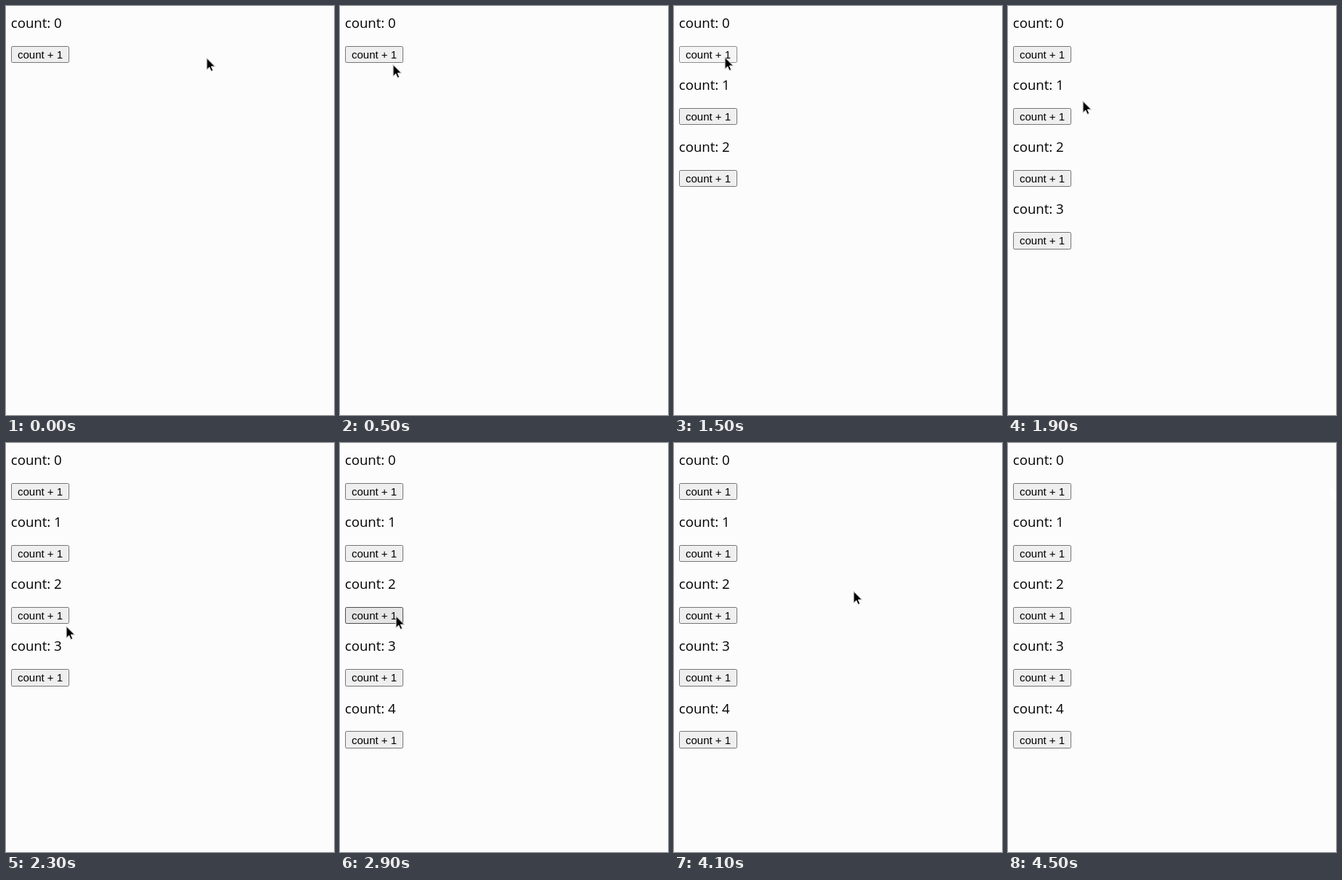
Recreate the animation shown at these times as an HTML page. Size 451x561 px, loop 4800 ms.

```html
<!DOCTYPE html>
<html lang="en">
<head>
<meta charset="utf-8">
<title>Counter</title>
<style>
  html, body { margin: 0; width: 100%; height: 100%; overflow: hidden; background: #fcfcfc; }
  svg { display: block; width: 451px; height: 561px; }
  .label { font: 18.6px "Open Sans", "Noto Sans", sans-serif; }
  .caption { font: 15px "Liberation Sans", Arial, sans-serif; }
  rect { fill: #efefef; stroke: #767676; }
  .hover rect { fill: #e5e5e5; stroke: #4f4f4f; }
  .active rect { fill: #f5f5f5; stroke: #8d8d8d; }
  #cursor { stroke: #fff; filter: drop-shadow(.5px .5px .7px #0006); }
  #cursor.leaving { fill: #fff; filter: none; }
</style>
</head>
<body>
<svg viewBox="0 0 451 561">
  <g id="list"></g>
  <path id="cursor" d="M1 .5V16.5L4.7 13L7.1 18.5L9.7 17.4L7.3 12H12.5Z"/>
</svg>
<script>
const LOOP = 4800, STEP = 100, PITCH = 85.2;
const list = document.getElementById('list');
const cursor = document.getElementById('cursor');

// When each counter appears, and when the mouse button is held down
const births = [0, 800, 1100, 1600, 2900];
const presses = [1500, 2800];

// Mouse moves, each a quadratic curve from, via and to a point
const home = [275, 71], first = [69, 70], below = [82, 251], third = [76, 237],
  rest = [195, 232], exit = [443, 60];
const moves = [
  { start: 0, end: 600, from: home, via: [58, 105], to: first },
  { start: 1700, end: 2300, from: first, via: [140, 160], to: below },
  { start: 2300, end: 2600, from: below, via: [79, 244], to: third },
  { start: 3300, end: 3600, from: third, via: [135, 236], to: rest },
  { start: 4000, end: 4500, from: rest, via: [323, 163], to: exit }
];

const blocks = births.map((birth, i) => {
  const y = base => Math.round(base + i * PITCH);
  const top = y(54.6), bottom = y(78);
  const el = document.createElementNS('http://www.w3.org/2000/svg', 'g');
  el.innerHTML = `<text class="label" x="6.8" y="${y(29.8)}">count: ${i}</text>
    <rect x="7.5" y="${top + .5}" width="79" height="${bottom - top - 1}" rx="1.7"/>
    <text class="caption" x="16" y="${y(71.8)}">count + 1</text>`;
  list.append(el);
  return { el, birth, top, bottom };
});

function mouseAt(t) {
  const { start, end, from, via, to } = moves.findLast(move => move.start <= t);
  const u = Math.min((t - start) / (end - start), 1), v = 1 - u;
  return from.map((p, i) => Math.round(v * v * p + 2 * u * v * via[i] + u * u * to[i]));
}

function draw(now) {
  const t = Math.floor(now % LOOP / STEP) * STEP;
  const [x, y] = mouseAt(t);
  cursor.setAttribute('transform', `translate(${x} ${y})`);
  cursor.classList.toggle('leaving', x >= exit[0]);
  for (const { el, birth, top, bottom } of blocks) {
    const over = x < 87 && y >= top && y < bottom;
    el.style.display = t < birth ? 'none' : '';
    el.setAttribute('class', !over ? '' : presses.includes(t) ? 'active' : 'hover');
  }
}

const origin = performance.now();
function tick() {
  draw(performance.now() - origin);
  requestAnimationFrame(tick);
}
tick();
</script>
</body>
</html>
```
